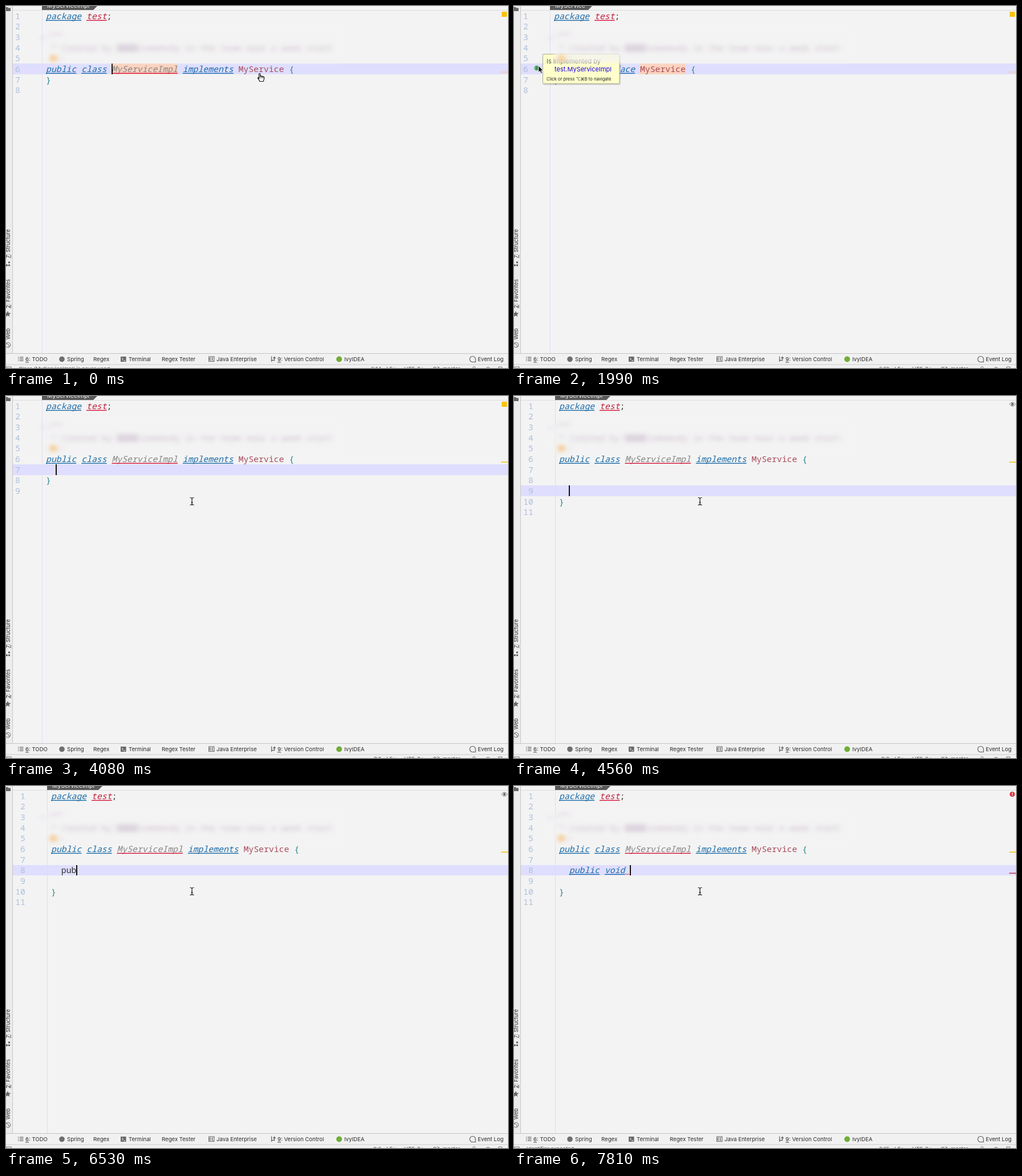
Recreate the animation shown at these times as an HTML page. Size 880 by 636 pixels, loop 8000 ms.

```html
<!DOCTYPE html>
<html lang="en">
<head>
<meta charset="utf-8">
<title>Editor</title>
<style>
html, body { margin: 0; width: 100%; height: 100%; overflow: hidden; background: #f3f3f3; }
svg { display: block; width: 880px; height: 636px; }
text { white-space: pre; font: 9.6px Inter, Roboto, sans-serif; fill: #2b2b2b; }
.code text { font: 300 14.8px "Noto Sans Mono", "DejaVu Sans Mono", monospace; fill: #333; }
.code .num { fill: #aebfd9; }
.code .kw { fill: #1c6ca8; font-style: italic; }
.code .bad { fill: #c01f3c; font-style: italic; }
.code .unused { fill: #858585; font-style: italic; }
.code .type { fill: #a84c5b; }
.code .brace { fill: #2b8585; }
.status text { font-size: 9.4px; fill: #555; }
</style>
</head>
<body>
<svg viewBox="0 0 880 636">
  <rect width="880" height="636" fill="#f3f3f3"/>
  <g id="editor" class="code"></g>
  <g id="tip"></g>
  <defs>
    <filter id="soft" x="-20%" y="-60%" width="140%" height="220%"><feGaussianBlur stdDeviation="4.2 3.6"/></filter>
    <filter id="veil" x="-5%" y="-30%" width="110%" height="160%"><feGaussianBlur stdDeviation="2.5"/></filter>
  </defs>
  <rect x="70" y="46" width="515" height="54" fill="#f4f3f4" opacity=".72" filter="url(#veil)"/>
  <g id="comment" filter="url(#soft)"></g>
  <g id="mouse"></g>
  <g id="chrome"></g>
  <g id="status" class="status"></g>
</svg>
<script>
const CELL = 8.88, ROW = 18.67, LOOP = 8000;
const $ = id => document.getElementById(id);
const rowTop = n => Math.floor(8.6 + (n - 1) * ROW);
const baseline = n => Math.round(22.6 + (n - 1) * ROW);
const rect = (x, y, w, h, fill, more = '') =>
  `<rect x="${x}" y="${y}" width="${w}" height="${h}" fill="${fill}" ${more}/>`;
const path = (d, fill, stroke = 'none', more = '') =>
  `<path d="${d}" fill="${fill}" stroke="${stroke}" ${more}/>`;
const dot = (x, y, r, fill, more = '') => `<circle cx="${x}" cy="${y}" r="${r}" fill="${fill}" ${more}/>`;
const label = (x, y, s, more = '') => `<text x="${x}" y="${y}" ${more}>${s}</text>`;

// Each step changes part of the state and keeps the rest.
const steps = [
  [0, { file: 'MyServiceImpl', rows: 8, row: 6, col: 13, caret: 'bar', mark: true, typed: '', tip: false,
        light: 'warn', note: "Class 'MyServiceImpl' is never used", mouse: ['hand', 447, 125] }],
  [140, { file: 'MyService', col: 17, note: '' }],
  [300, { mouse: ['beam', 425, 128] }],
  [460, { mouse: ['beam', 320, 126] }],
  [620, { mouse: ['beam', 180, 121] }],
  [780, { mouse: ['arrow', 60, 112] }],
  [930, { mouse: ['arrow', 19, 110] }],
  [1090, { mouse: ['arrow', 24, 109] }],
  [1240, { mouse: ['arrow', 36, 107] }],
  [1390, { mouse: ['arrow', 43, 105] }],
  [1540, { caret: '' }],
  [1690, { tip: true }],
  [2140, { file: 'MyServiceImpl', col: 13, caret: 'bar', tip: false }],
  [2280, { note: "Class 'MyServiceImpl' is never used" }],
  [2430, { mouse: ['beam', 326, 185] }],
  [2880, { caret: 'block', col: 12 }],
  [3330, { mark: false }],
  [3480, { rows: 9, row: 7, col: 2, caret: 'bar', light: 'eye', note: '' }],
  [4080, { light: 'warn' }],
  [4560, { rows: 11, row: 9, light: 'eye' }],
  [5010, { row: 8 }],
  [5330, { light: 'warn' }],
  [6080, { caret: '' }],
  [6380, { typed: 'p', caret: 'bar', light: 'eye' }],
  [6530, { typed: 'pub' }],
  [6680, { typed: 'publ' }],
  [6830, { typed: 'public' }],
  [6980, { typed: 'public ' }],
  [7130, { typed: 'public v' }],
  [7310, { typed: 'public vo' }],
  [7490, { typed: 'public void' }],
  [7650, { typed: 'public void ' }],
  [7810, { light: 'error', note: 'Identifier expected' }]
];
const states = [];
steps.forEach(([, change], i) => states.push({ ...states[i - 1], ...change }));

const kinds = { package: 'kw', public: 'kw', class: 'kw', interface: 'kw', implements: 'kw', void: 'kw',
  test: 'bad', MyServiceImpl: 'unused', MyService: 'type', '{': 'brace', '}': 'brace' };
const lines = { kw: '#1c6ca8', bad: '#d6123a', unused: '#d6123a' };

function codeLine(left, n, source, col = 0) {
  const base = baseline(n);
  return [...source.matchAll(/\w+|[^\s\w]/g)].map(m => {
    const kind = kinds[m[0]] || '', x = left + (col + m.index) * CELL;
    const under = lines[kind] ? rect(x, base + 1.6, m[0].length * CELL, 1.4, lines[kind]) : '';
    return label(x, base, m[0], `class="${kind}"`) + under;
  }).join('');
}

function lightIcon(kind) {
  if (kind === 'warn') return rect(869, 10, 9, 9, '#f7c300');
  if (kind === 'error') return dot(873.5, 14.5, 4.6, '#dc3545') + rect(873, 11.7, 1.2, 3.5, '#fff') + rect(873, 16, 1.2, 1.3, '#fff');
  return path('M868.5 14.5Q873.7 7.8 879 14.5Q873.7 21.2 868.5 14.5Z', '#fff', '#777') + dot(873.7, 14.5, 2.3, '#666');
}

function drawEditor(s) {
  const shift = s.rows > 9 ? 9 : 0, left = 70 + shift, top = rowTop(s.row);
  const isClass = s.file === 'MyServiceImpl';
  const col = s.col + s.typed.length;
  const height = rowTop(s.row + 1) - top;
  let out = rect(12, top, 868, height, '#dfdefe');
  out += rect(63 + shift, 0, 1, 610, '#dedcf2');
  if (s.mark) out += rect(left + (isClass ? 13 : 17) * CELL, top, s.file.length * CELL, height, '#fbd2bf');
  const tabEnd = left + (isClass ? 90 : 67);
  out += path(`M${left - 7} 0H${tabEnd}L${tabEnd - 7} 7H${left - 7}Z`, '#595959');
  out += label(left + 2, 3, s.file, 'style="font:10.5px Inter,sans-serif;fill:#fff"');
  for (let n = 1; n <= s.rows; n++)
    out += label(34 - (shift ? 0 : 9), baseline(n), n, 'class="num" text-anchor="end"');
  out += codeLine(left, 1, 'package test;');
  out += codeLine(left, 6, isClass ? 'public class MyServiceImpl implements MyService {' : 'public interface MyService {');
  out += codeLine(left, s.rows - 1, '}');
  if (s.typed) out += codeLine(left, s.row, s.typed, 2);
  if (!isClass) out += dot(40, 109, 4.6, '#55b167') + rect(39.5, 106.5, 1.2, 5, '#285c32');
  const x = left + col * CELL;
  if (s.caret === 'bar') out += rect(Math.round(x - .3), top, 2, height, '#111');
  if (s.caret === 'block') out += rect(x, top, CELL - .5, height, '#080808');
  out += rect(868, 115.5, 12, 1.5, s.mark ? '#fac996' : '#f5c400');
  if (s.light === 'error') {
    const wx = x - CELL, wy = top + 17;
    out += path(`M${wx} ${wy}l2-2 2 2 2-2 2 2`, 'none', '#dc3545') + rect(868, 152.5, 12, 1.5, '#cc3355');
  }
  $('editor').innerHTML = out + lightIcon(s.light);
}

function drawTip(s) {
  $('tip').innerHTML = !s.tip ? '' :
    rect(51, 86, 136, 53, '#000', 'opacity=".12" rx="2"') +
    rect(50.5, 84.5, 134.5, 52, '#feffca', 'stroke="#a9a98c" rx="1.5"') +
    label(57, 100.5, 'Is implemented by', 'style="font-size:11px;fill:#555"') +
    label(71, 115, 'test.MyServiceImpl', 'style="font-size:11px;fill:#2100f0"') +
    label(57, 130.5, 'Click or press ⌥⌘B to navigate', 'style="font-size:7.6px;fill:#222"');
}

const pointers = {
  hand: path('M-3.5 2V-5.5Q-2.5-7.5-1.3-5.5V-1.5Q0-2.8 1.2-1.2Q2.5-2.2 3.4-.7Q5.6-1.2 5.6 1.2Q5.6 4 4 7.5H-2.2Q-3.2 4.5-5.6 1.8Q-5.8-.2-3.5 2Z', '#fff', '#111', 'stroke-width="1.2"')
    + path('M-1.2-1V2M1.2-1V2M3.4-.5V2', 'none', '#111', 'stroke-width=".8"'),
  beam: path('M-3.5-6.5Q0-6.5 0-4.5Q0-6.5 3.5-6.5M0-5V5M-3.5 6.5Q0 6.5 0 4.5Q0 6.5 3.5 6.5M-1.8 2H1.8', 'none', '#1a1a1a', 'stroke-width="1.2"'),
  arrow: path('M0 0V11.5L2.6 9.2L4.4 13.2L6.4 12.3L4.7 8.4H8Z', '#0a0a0a', '#fff', 'stroke-width=".8"')
};

function drawStatus(s) {
  const col = s.col + s.typed.length + 1;
  $('status').innerHTML = label(22, 641, s.note) +
    label(658, 641, `${s.row}:${col}`, 'text-anchor="end"') +
    label(667, 641, 'LF÷') + label(698, 641, 'UTF-8÷') + label(748, 641, 'Git: master÷') +
    path('M818.5 637v-1.5a2 2 0 0 1 4 0v1.5M841 637q4-5 8 0M863.5 637v-3h6v3', 'none', '#777');
}

function drawChrome() {
  const grey = '#666', bar = [
    [34, '6: TODO', 1], [107, 'Spring'], [153, 'Regex'], [215, 'Terminal'], [273, 'Regex Tester'],
    [369, 'Java Enterprise'], [476, '9: Version Control', 1], [593, 'IvyIDEA'], [827, 'Event Log']
  ];
  const side = [[443, '7: Structure', 1], [531, '2: Favorites', 1], [586, 'Web']];
  let out = rect(0, 0, 11, 610, '#ececec') + rect(11, 0, 1, 610, '#c6c6c6') + rect(12, 7, 868, 1, '#dcdcdc');
  out += rect(0, 610, 880, 26, '#f1f1f1') + rect(0, 610, 880, 1, '#c4c4c4') + rect(0, 629.5, 880, 1, '#c9c9c9');
  for (const [x, s, key] of bar)
    out += label(x, 624, s) + (key ? rect(x, 625.5, 6, .9, '#333') : '');
  for (const [y, s, key] of side)
    out += `<g transform="translate(6.5 ${y}) rotate(-90)">${label(0, 0, s, 'style="font-size:9.3px"')}${key ? rect(0, 1.4, 6, .8, '#333') : ''}</g>`;
  out += path('M0 2H3L4.5 3.5H8V9H0Z', grey);
  out += rect(0, 454, 3, 3, grey) + rect(4, 454, 3, 3, grey) + rect(4, 449, 3, 3, grey);
  out += path('M3 535.5L4.5 539.2L8.5 539.4L5.4 542L6.5 546L3 543.8L-.5 546L.6 542L-2.5 539.4L1.5 539.2Z', grey);
  out += dot(3.5, 595.5, 4.3, 'none', 'stroke="#666"') + path('M0 594Q4 592 4 596Q7 596 5 599', 'none', grey);
  for (const y of [616.5, 619.5, 622.5]) out += rect(21, y, 1.5, 1.3, grey) + rect(24, y, 6.5, 1.3, grey);
  out += dot(98, 620.5, 4.8, '#6e6e6e') + dot(584, 620.5, 5, '#70ad35');
  out += rect(201, 616, 9.5, 9, grey) + path('M203 618L205.5 620.2L203 622.4M206 623H209', 'none', '#fff');
  out += rect(355.5, 616, 9.5, 8.5, 'none', 'stroke="#666"') + path('M359.5 618H357V622.5H359.5M357 620.2H359M363.7 618H361.2V622.5H363.7M361.2 620.2H363', 'none', grey);
  out += path('M465.5 615.5V625M465.5 622.5H470.5V617M468.5 619L470.5 616.5L472.5 619', 'none', grey, 'stroke-width="1.3"');
  out += path('M818 625.5H823V620.5A5 5 0 1 0 818 625.5Z', 'none', '#555', 'stroke-width="1.1"');
  out += rect(1, 634, 8, 6, 'none', 'stroke="#777"');
  $('chrome').innerHTML = out;
  const mono = 'style="font:14.8px Noto Sans Mono,monospace;fill:#9b7a9d;opacity:.45"';
  $('comment').innerHTML = label(72, 57, '/**', mono) + label(79, 79, '* Created by', mono) +
    rect(194, 67, 38, 14, '#97779f', 'opacity=".24"') +
    label(234, 79, 'somebody in the team near a week start', mono) +
    rect(60, 52, 6, 8, '#d9d6f0', 'opacity=".5"') +
    dot(83, 92, 6.5, '#f7b65c', 'opacity=".65"') + label(92, 98, '/', mono);
}

let shown = -1;
function frame() {
  const t = performance.now() % LOOP;
  const now = steps.findLastIndex(([at]) => at <= t);
  if (now !== shown) {
    shown = now;
    const s = states[now], [kind, x, y] = s.mouse;
    drawEditor(s);
    drawTip(s);
    drawStatus(s);
    $('mouse').innerHTML = `<g transform="translate(${x} ${y})">${pointers[kind]}</g>`;
  }
  requestAnimationFrame(frame);
}
drawChrome();
frame();
</script>
</body>
</html>
```
